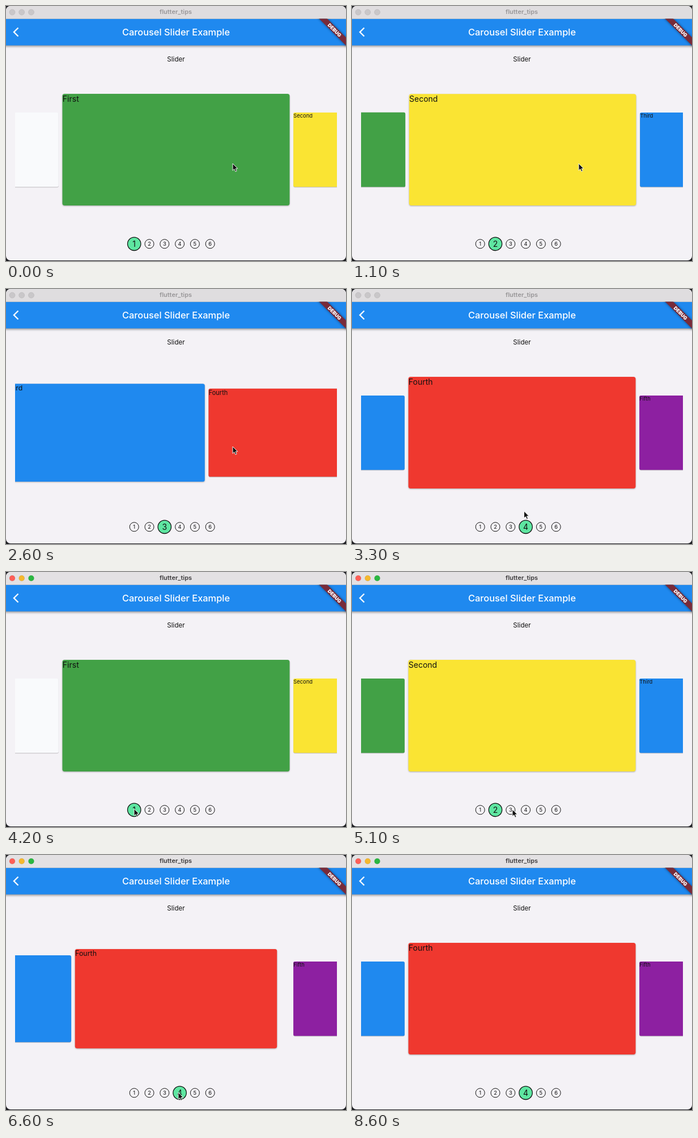
An HTML page for the animation above (8.7 s loop, 600x450 px).

```html
<!DOCTYPE html>
<html lang="en">
<head>
<meta charset="utf-8">
<title>Carousel Slider Example</title>
<style>
  html, body { margin: 0; width: 100%; height: 100%; overflow: hidden; background: #1c1d21; }
  svg { display: block; width: 600px; height: 450px; font-family: Inter, Roboto, sans-serif; }
  text { fill: #111; }
  .middle { text-anchor: middle; }
  .bar { fill: #dfdddf; }
  .window-title { font-size: 11px; font-weight: 600; fill: #989698; }
  .light { fill: #c9c7c9; stroke: #b7b5b7; stroke-width: .6; }
  .focused .bar { fill: #e3e1e3; }
  .focused .window-title { fill: #3d3b3d; }
  .focused .light { fill: var(--tint); stroke: rgba(0, 0, 0, .15); }
  .app-title { font-size: 16.4px; font-weight: 500; fill: #fff; }
  .debug { font-size: 8.6px; font-weight: 900; fill: #fff; }
  .card { filter: drop-shadow(0 1px 1px rgba(0, 0, 0, .3)); }
  .card text { font-size: 14px; }
  .dot circle { fill: none; stroke: #111; stroke-width: 1; r: 8px; }
  .dot text { font-size: 9.4px; }
  .dot.on circle { fill: #5ee6a1; stroke-width: 1.3; r: 11.7px; }
  .dot.on text { font-size: 14px; }
</style>
</head>
<body>
<svg id="stage" viewBox="0 0 600 450">
  <defs>
    <clipPath id="windowShape"><rect width="600" height="449" rx="8"/></clipPath>
    <clipPath id="viewport"><rect x="16" y="120" width="568" height="270"/></clipPath>
    <clipPath id="content"><rect y="22.5" width="600" height="427"/></clipPath>
    <filter id="soft" x="-20%" y="-100%" width="140%" height="300%"><feGaussianBlur stdDeviation="2"/></filter>
  </defs>
  <g clip-path="url(#windowShape)">
    <rect width="600" height="450" fill="#f4f2f6"/>
    <rect x="-10" y="30" width="620" height="41" opacity=".45" filter="url(#soft)"/>
    <rect y="22.5" width="600" height="47" fill="#1f89ef"/>
    <rect class="bar" width="600" height="22.5"/>
    <rect y="22" width="600" height=".6" fill="#b9b7ba"/>
    <circle class="light" style="--tint:#fe5f57" cx="11" cy="11" r="5"/>
    <circle class="light" style="--tint:#f5b82e" cx="27.7" cy="11" r="5"/>
    <circle class="light" style="--tint:#2bb741" cx="44.5" cy="11" r="5"/>
    <text class="window-title middle" x="299.5" y="14.3">flutter_tips</text>
    <path d="M21.5 38.5 14 46l7.500 7.500" fill="none" stroke="#fff" stroke-width="2.4"/>
    <text class="app-title middle" x="300" y="52">Carousel Slider Example</text>
    <g clip-path="url(#content)">
      <g transform="translate(600 22.300) rotate(45)">
        <rect x="-40" y="23.500" width="80" height="10.100" opacity=".5" filter="url(#soft)"/>
        <rect x="-40" y="23.500" width="80" height="10.100" fill="#782b3a"/>
        <text class="debug middle" x="0" y="31.700">DEBUG</text>
      </g>
    </g>
    <text class="middle" x="300" y="98" font-size="11.6">Slider</text>
    <g id="cards" clip-path="url(#viewport)"></g>
    <g id="dots"></g>
  </g>
  <path id="cursor" d="M0 0V12.300L2.900 9.700 4.900 14.200 7.100 13.200 5.100 8.900H8.900Z"
        fill="#111" stroke="#fff" stroke-width=".9" stroke-linejoin="round"/>
</svg>
<script>
  const LOOP = 8700, STEP = 100, SPACING = 340.8;
  const CARD_W = 401, CARD_H = 197, CENTER_Y = 253.6, SHRINK = 1 / 3;
  const slides = [
    ['First', '#42a146'], ['Second', '#fae433'], ['Third', '#1f89ef'],
    ['Fourth', '#ef382f'], ['Fifth', '#8d20a1'], ['Sixth', '#f9fafc']
  ];
  const autoStarts = [360, 1360, 2360];
  const AUTO_TIME = 800;
  const focusTime = 3500;
  // time, slide
  const clicks = [[4000, 0], [4700, 1], [5500, 2], [6500, 3]];
  // time, x, y
  const cursorPath = [
    [0, 400, 278], [2700, 400, 278], [3300, 303.5, 392], [3500, 306, 416],
    [3650, 306, 416], [3950, 226, 418], [4200, 226, 418], [4600, 254, 419],
    [4800, 254, 419], [5050, 283, 419], [5800, 283, 419], [6200, 304, 419],
    [6900, 304, 419], [7300, 318, 466]
  ];

  const stage = document.getElementById('stage');
  const cursor = document.getElementById('cursor');
  const clamp = v => Math.max(0, Math.min(1, v));
  const mix = (a, b, k) => a + (b - a) * k;
  const wrap = i => ((i % slides.length) + slides.length) % slides.length;

  function add(parent, tag, attrs) {
    const node = document.createElementNS('http://www.w3.org/2000/svg', tag);
    for (const key in attrs) node.setAttribute(key, attrs[key]);
    return parent.appendChild(node);
  }

  const cards = Array.from({ length: 5 }, () => {
    const group = add(document.getElementById('cards'), 'g', { class: 'card' });
    const face = add(group, 'rect', {
      x: -CARD_W / 2, y: -CARD_H / 2, width: CARD_W, height: CARD_H, rx: 4
    });
    const label = add(group, 'text', { x: -CARD_W / 2 + .3, y: -CARD_H / 2 + 14 });
    return { group, face, label };
  });

  const dots = slides.map((_, i) => {
    const x = 226.2 + i * 26.8;
    const group = add(document.getElementById('dots'), 'g', { class: 'dot' });
    add(group, 'circle', { cx: x, cy: 419.8 });
    const label = add(group, 'text', { class: 'middle', x, y: 419.8, dy: '.37em' });
    label.textContent = i + 1;
    return group;
  });

  // cubic-bezier(.4, 0, .2, 1)
  function fastOutSlowIn(x) {
    let lo = 0, hi = 1;
    for (let i = 0; i < 24; i++) {
      const s = (lo + hi) / 2, u = 1 - s;
      if (1.2 * u * u * s + .6 * u * s * s + s ** 3 < x) lo = s; else hi = s;
    }
    return lo * lo * (3 - 2 * lo);
  }

  // Scaling trails the scroll position after a tap.
  function pagesAt(t) {
    let scroll = 0;
    for (const start of autoStarts) scroll += fastOutSlowIn(clamp((t - start) / AUTO_TIME));
    let scale = scroll;
    for (const [start, page] of clicks) {
      if (t < start) break;
      scroll = mix(scroll, page, clamp((t - start) / 100));
      scale = mix(scale, page, clamp((t - start) / 150));
      if (t >= start + 100) scroll = page;
    }
    return { scroll, scale };
  }

  function cursorAt(t) {
    const next = cursorPath.findIndex(p => p[0] > t);
    if (next < 0) return cursorPath[cursorPath.length - 1].slice(1);
    const [t0, x0, y0] = cursorPath[next - 1], [t1, x1, y1] = cursorPath[next];
    const k = (t - t0) / (t1 - t0), eased = k * k * (3 - 2 * k);
    return [mix(x0, x1, eased), mix(y0, y1, eased)];
  }

  function draw(t) {
    const { scroll, scale } = pagesAt(t);
    const current = Math.round(scroll);
    cards.forEach(({ group, face, label }, i) => {
      const page = current + i - 2;
      const [name, color] = slides[wrap(page)];
      const size = 1 - SHRINK * clamp(Math.abs(page - scale));
      const x = 300 + (page - scroll) * SPACING;
      group.setAttribute('transform', `translate(${x} ${CENTER_Y}) scale(${size})`);
      face.setAttribute('fill', color);
      label.textContent = name;
    });
    dots.forEach((dot, i) => dot.classList.toggle('on', i === wrap(current)));
    stage.classList.toggle('focused', t >= focusTime);
    cursor.setAttribute('transform', `translate(${cursorAt(t)})`);
  }

  function tick(now) {
    draw(Math.floor((now % LOOP) / STEP) * STEP);
    requestAnimationFrame(tick);
  }
  draw(0);
  requestAnimationFrame(tick);
</script>
</body>
</html>
```
